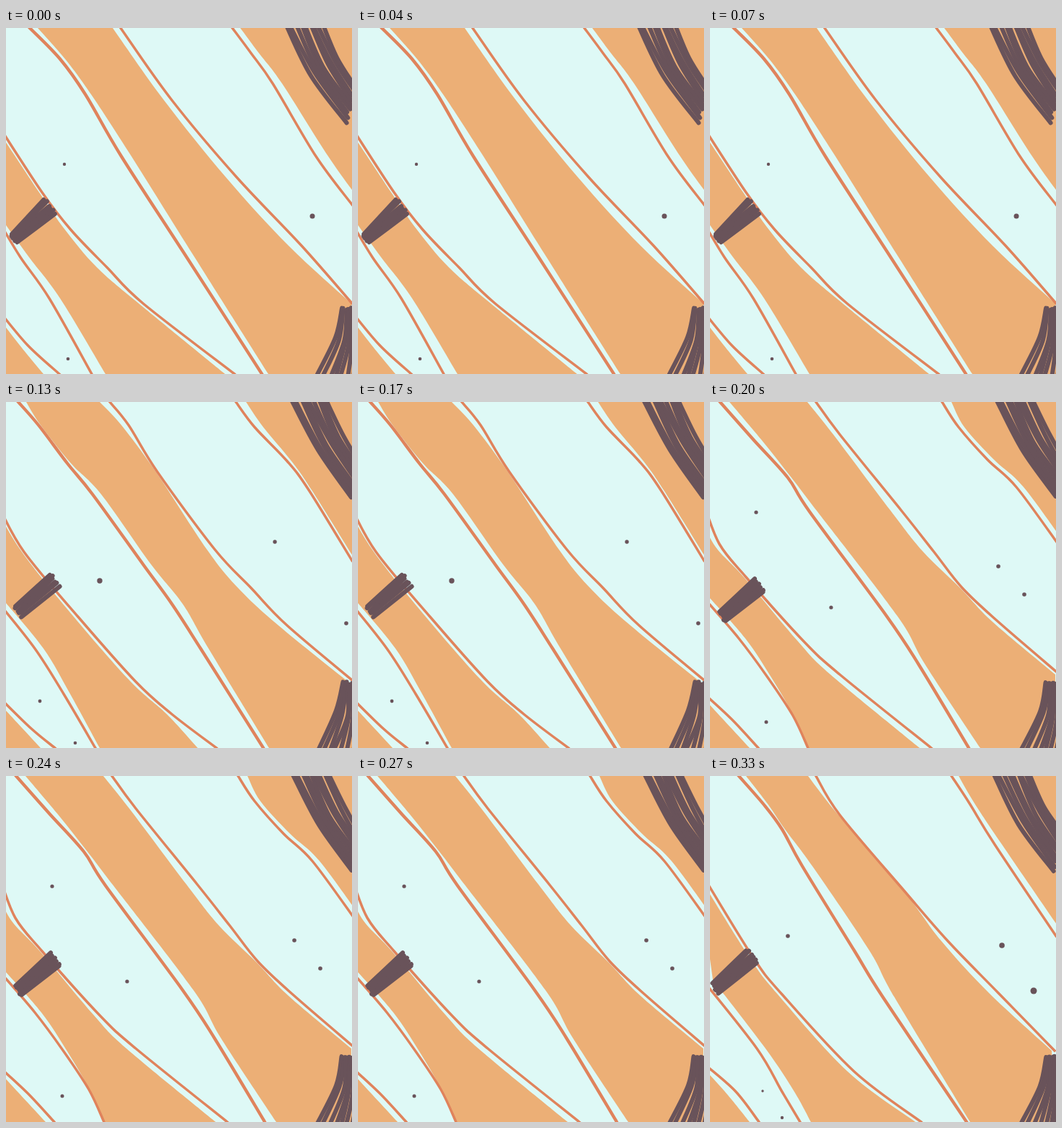
These frames come from a looping animation (480x480 px, 0.39 s). An HTML page with a canvas:

```html
<!DOCTYPE html>
<html>
<head>
<meta charset="utf-8">
<style>
html, body { margin: 0; overflow: hidden; background: #def9f6; }
canvas { display: block; width: 480px; height: 480px; }
</style>
</head>
<body>
<canvas id="stage" width="480" height="480"></canvas>
<script>
const ctx = document.getElementById('stage').getContext('2d');
const PAPER = '#def9f6', SAND = '#ecaf76', RUST = '#e0835c', INK = '#69535a';

// Key points "x,y,gap" of each rust line; the sand starts `gap` to its right.
// The shifts move the top and left hatching, specks are "x,y,radius".
const poses = [
  {
    until: 130,
    top: '314,0,11 340,35,11 370,77,13 430,178,17 480,245,15',
    right: '159,0,-11 230,100,-11 320,207,-15 410,302,-18 480,382,-1',
    left: '33,0,11 75,43,7 110,92,8 160,178,14 250,317,11 355,480,9',
    upper: '-10,136,-5 50,228,-4 90,280,-8 140,332,-14 190,382,-6 317,480,-13',
    lower: '-10,268,6 20,318,12 60,375,15 119,480,19',
    corner: '-10,392,-8 30,440,-11 74,480,-22',
    topShift: [0, 0], leftShift: [0, 0],
    specks: '81,189,2.2 425,261,3.5 86,459,2.3'
  },
  {
    until: 200,
    top: '319,0,14 345,35,12 390,82,6 420,122,4 480,220,5',
    right: '144,0,-14 170,32,-10 210,97,-2 290,205,-11 340,258,-18 390,310,-12 490,394,-8',
    left: '17,0,11 45,32,3 85,85,5 120,128,12 190,225,11 230,280,15 270,342,11 357,480,8',
    upper: '-10,145,-5 25,208,-3 100,298,-6 180,388,-7 230,433,-7 292,480,-26',
    lower: '-10,279,10 40,342,12 80,405,9 124,480,6',
    corner: '-10,409,-8 35,453,-12 68,480,-20',
    topShift: [7, 2], leftShift: [6, -1],
    specks: '130,248,3.7 373,194,2.7 472,307,2.8 47,415,2.4 96,473,2.3'
  },
  {
    until: 330,
    top: '322,0,13 345,35,8 385,80,9 425,118,10 485,200,10',
    right: '147,0,-12 180,45,-9 265,150,-15 310,207,-15 350,258,-3 400,305,-8 485,378,-6',
    left: '14,0,13 60,52,11 108,105,5 138,152,11 245,297,15 290,365,9 359,480,16',
    upper: '-8,143,-10 13,197,-8 50,243,-3 130,332,-8 180,378,-13 307,480,-16',
    lower: '-10,270,8 40,328,9 80,382,5 115,435,1 136,480,1',
    corner: '-10,403,-6 30,440,-12 67,480,-12',
    topShift: [8, 1], leftShift: [7, 7],
    specks: '64,153,2.6 168,285,2.6 400,228,2.8 436,267,2.8 78,444,2.5'
  },
  {
    until: 390,
    top: '335,0,10 360,38,7 395,95,10 480,222,12',
    right: '147,0,-11 180,54,-2 270,160,-1 330,229,-9 400,301,-13 478,381,-4',
    left: '40,0,10 75,40,6 100,74,4 128,125,14 200,242,21 240,307,16 356,480,5',
    upper: '-10,138,-6 60,252,-5 100,303,-6 200,410,-9 293,480,-8',
    lower: '-10,283,14 65,378,12 100,438,17 125,480,15',
    corner: '-10,398,-6 35,437,-15 68,480,-13',
    topShift: [5, 1], leftShift: [-3, 2],
    specks: '108,222,2.8 405,235,3.8 449,298,4.5 73,437,1.7 100,474,2.2'
  }
];

const parse = text => text.split(' ').map(s => s.split(',').map(Number));
const edge = text => parse(text).map(([x, y, gap]) => [x + gap, y]);

// Adds a Catmull-Rom curve through the points.
function curve(path, p) {
  path.lineTo(...p[0]);
  for (let i = 0; i < p.length - 1; i++) {
    const a = p[i - 1] || p[i], b = p[i], c = p[i + 1], d = p[i + 2] || c;
    path.bezierCurveTo(
      b[0] + (c[0] - a[0]) / 6, b[1] + (c[1] - a[1]) / 6,
      c[0] - (d[0] - b[0]) / 6, c[1] - (d[1] - b[1]) / 6, c[0], c[1]);
  }
}

function band(...parts) {
  const path = new Path2D();
  parts.forEach(p => curve(path, p));
  ctx.fillStyle = SAND;
  ctx.fill(path);
}

function stroke(points, color, width, cap) {
  const path = new Path2D();
  curve(path, points);
  ctx.strokeStyle = color;
  ctx.lineWidth = width;
  ctx.lineCap = cap;
  ctx.stroke(path);
}

function random(seed) {
  return () => {
    seed = (seed * 16807) % 2147483647;
    return seed / 2147483647;
  };
}

// Loose pen strokes spread evenly from one key stroke to another.
function hatch(rand, from, to, count, [dx, dy]) {
  const a = parse(from), b = parse(to);
  const jitter = () => (rand() - 0.5) * 4;
  for (let i = 0; i < count; i++) {
    const k = i / (count - 1);
    const points = a.map(([x, y], n) => [
      x + (b[n][0] - x) * k + dx + jitter(),
      y + (b[n][1] - y) * k + dy + jitter()
    ]);
    stroke(points, INK, 6, 'round');
  }
}

function draw(pose) {
  ctx.fillStyle = PAPER;
  ctx.fillRect(0, 0, 480, 480);

  band(edge(pose.top), [[480, 0]]);
  band(edge(pose.left), [[480, 480]], edge(pose.right).reverse());
  band(edge(pose.upper), edge(pose.lower).reverse());
  band(edge(pose.corner), [[0, 480]]);

  for (const name of ['top', 'right', 'left', 'upper', 'lower', 'corner']) {
    stroke(parse(pose[name]), RUST, name === 'left' ? 4.3 : 3.5, 'square');
  }

  const rand = random(pose.until * 7919);
  hatch(rand, '390,-4 425,66 471,130', '439,-4 460,42 485,84', 9, pose.topShift);
  hatch(rand, '466,390 459,430 432,482', '482,390 486,440 480,490', 7, [0, 0]);
  hatch(rand, '7,284 54,239', '14,298 68,256', 6, pose.leftShift);

  ctx.fillStyle = INK;
  for (const [x, y, r] of parse(pose.specks)) {
    ctx.beginPath();
    ctx.arc(x, y, r, 0, 7);
    ctx.fill();
  }
}

let shown;
function tick() {
  const t = performance.now() % 390;
  const pose = poses.find(p => t < p.until);
  if (pose !== shown) draw(shown = pose);
  requestAnimationFrame(tick);
}
tick();
</script>
</body>
</html>
```
